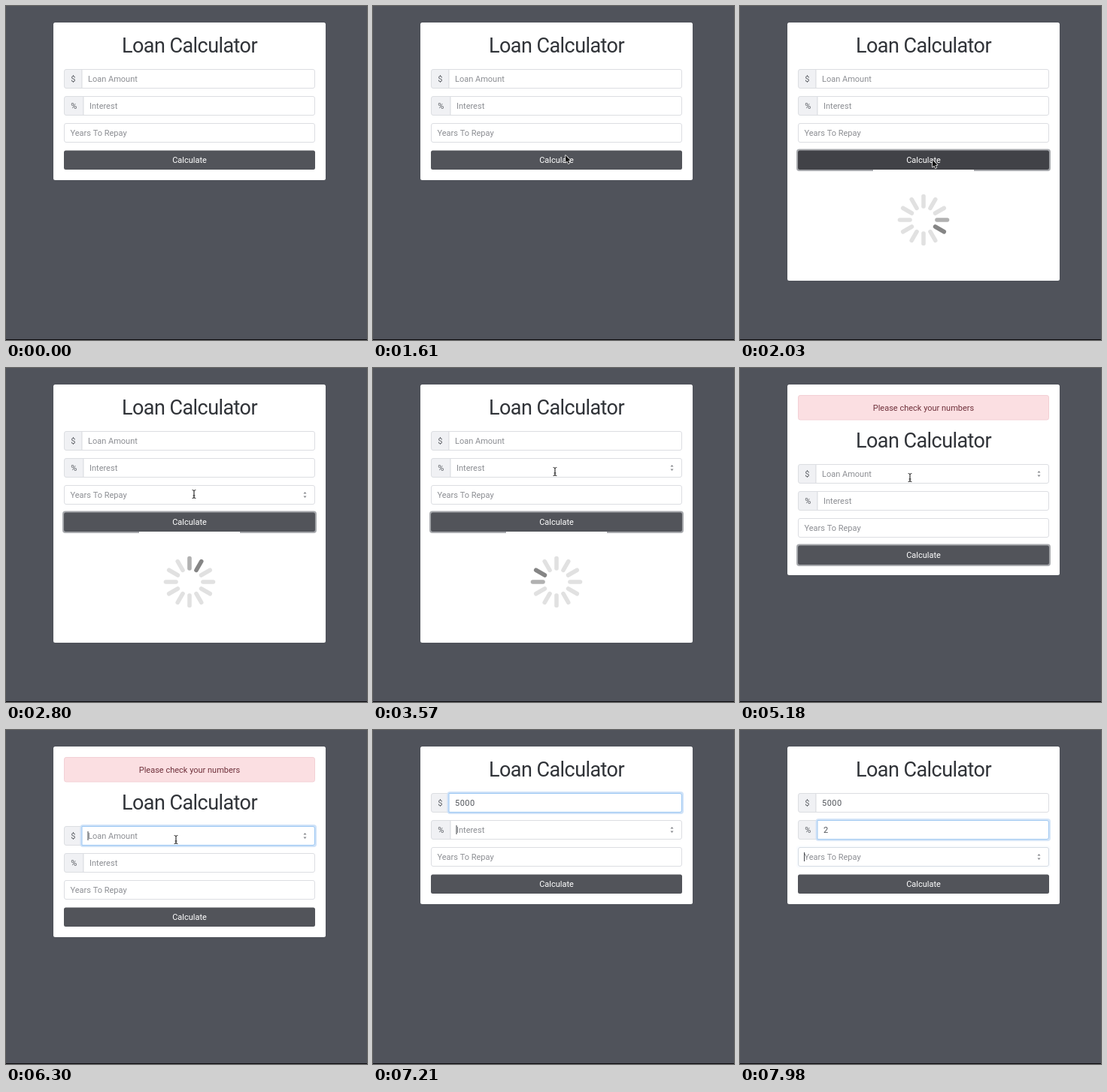
Recreate the animation shown at these times as an HTML page with a canvas. Size 480 by 445 pixels, loop 8000 ms.

```html
<!DOCTYPE html>
<html lang="en">
<head>
<meta charset="utf-8">
<title>Loan Calculator</title>
<style>
html, body { margin: 0; width: 480px; height: 445px; overflow: hidden; background: #50535b; }
canvas { display: block; }
</style>
</head>
<body>
<canvas id="stage" width="480" height="445"></canvas>
<script>
const ctx = document.getElementById('stage').getContext('2d');
const LOOP = 8000;
const FADE = 150;

// Moments of the story, in ms
const LOADING = 2030, ALERT = 4130, LOAN_FOCUS = 5180, TYPING = 6370;
const ALERT_END = 7130, RATE_FOCUS = 7210, YEARS_FOCUS = 7965;

const BUTTON_HOVER = [[560, 880], [1625, 2480]];
const FIELD_HOVER = {
  loan: [[4960, LOAN_FOCUS]],
  rate: [[1090, 1300], [3060, 4330], [4660, 4870]],
  years: [[920, 1070], [1320, 1430], [2620, 3000]]
};

// Pointer path: time, x, y
const PATH = [
  [70, 262, 443], [350, 260, 320], [700, 258, 206], [880, 257, 187],
  [1200, 255, 138], [1470, 256, 189], [1610, 256, 199], [1960, 256, 205],
  [2400, 256, 205], [2800, 250, 168], [3220, 244, 140], [3570, 242, 138],
  [3850, 234, 140], [4060, 226, 150], [4130, 224, 197], [4620, 224, 197],
  [4800, 225, 176], [5040, 226, 146], [6370, 226, 146]
];

const clamp = v => Math.max(0, Math.min(1, v));
const within = (t, spans) => spans.some(([a, b]) => t >= a && t < b);
const fade = (t, on, off) => clamp((t - on) / FADE) - clamp((t - off) / FADE);
const mix = (a, b, k) => `rgb(${a.map((v, i) => Math.round(v + (b[i] - v) * k)).join(',')})`;

function box(x, y, w, h, r, fill, stroke) {
  ctx.beginPath();
  ctx.roundRect(x, y, w, h, r);
  if (fill) { ctx.fillStyle = fill; ctx.fill(); }
  if (stroke) { ctx.strokeStyle = stroke; ctx.lineWidth = 1; ctx.stroke(); }
}

function text(str, x, y, color, { size = 11, align = 'left', track = 0 } = {}) {
  ctx.font = `400 ${size}px Roboto, Inter, sans-serif`;
  ctx.letterSpacing = track + 'px';
  ctx.textAlign = align;
  ctx.textBaseline = 'alphabetic';
  ctx.fillStyle = color;
  ctx.fillText(str, x, y);
}

function ring(x, y, w, h, color, alpha) {
  if (alpha <= 0) return;
  ctx.save();
  ctx.globalAlpha = alpha;
  box(x - 2, y - 2, w + 4, h + 4, 4, color);
  ctx.restore();
}

function spinArrows(x, y) {
  ctx.fillStyle = '#85878b';
  for (const dir of [-1, 1]) {
    ctx.beginPath();
    ctx.moveTo(x - 2, y + dir * 1.5);
    ctx.lineTo(x + 2, y + dir * 1.5);
    ctx.lineTo(x, y + dir * 4);
    ctx.fill();
  }
}

function field({ y, sign, inset = 0, hint, value, focus = 0, spin, caret }) {
  const left = 77 + inset, width = 334 - inset, tx = left + 8.5;
  if (sign) {
    box(77.5, y + 0.5, inset, 25, [2.5, 0, 0, 2.5], '#f0f1f4', '#dcdee2');
    text(sign, 77.5 + inset / 2, y + 17, '#5d6066', { align: 'center' });
  }
  ring(left, y, width, 26, '#cfe2f8', focus);
  const corner = sign ? [0, 2.5, 2.5, 0] : 2.5;
  box(left + 0.5, y + 0.5, width - 1, 25, corner, '#fff', mix([220, 222, 226], [154, 199, 243], focus));
  if (value) text(value, tx, y + 17, '#50545a', { track: 0.45 });
  else text(hint, tx, y + 17, '#8c8e93');
  if (caret) {
    ctx.fillStyle = '#3f4247';
    ctx.fillRect(tx - 0.5, y + 7, 1, 12);
  }
  if (spin) spinArrows(397.5, y + 13);
}

function loader(t) {
  ctx.fillStyle = '#fff';
  ctx.fillRect(177, 218, 134, 134);
  const head = (4 + Math.floor((t - LOADING) / 84 + 0.3)) % 12;
  ctx.lineWidth = 5.6;
  ctx.lineCap = 'round';
  for (let i = 0; i < 12; i++) {
    const a = (i - 3) * Math.PI / 6;
    const age = (head - i + 12) % 12;
    ctx.strokeStyle = ['#858585', '#b1b1b1'][age] || '#e1e1e1';
    ctx.beginPath();
    ctx.moveTo(244 + Math.cos(a) * 18, 285 + Math.sin(a) * 18);
    ctx.lineTo(244 + Math.cos(a) * 31.5, 285 + Math.sin(a) * 31.5);
    ctx.stroke();
  }
  ctx.lineCap = 'butt';
}

function arrow(x, y) {
  ctx.beginPath();
  ctx.moveTo(x, y);
  ctx.lineTo(x, y + 9.5);
  ctx.lineTo(x + 2.2, y + 7.5);
  ctx.lineTo(x + 3.7, y + 11);
  ctx.lineTo(x + 5.2, y + 10.3);
  ctx.lineTo(x + 3.8, y + 7);
  ctx.lineTo(x + 6.6, y + 6.8);
  ctx.closePath();
  ctx.strokeStyle = '#fff';
  ctx.lineWidth = 1.4;
  ctx.lineJoin = 'round';
  ctx.stroke();
  ctx.fillStyle = '#111';
  ctx.fill();
}

function beam(x, y) {
  ctx.strokeStyle = '#222';
  ctx.lineWidth = 1.1;
  ctx.beginPath();
  ctx.moveTo(x, y - 4.5);
  ctx.lineTo(x, y + 4.5);
  for (const s of [-1, 1]) {
    ctx.moveTo(x - 2.4, y + s * 5.5);
    ctx.quadraticCurveTo(x, y + s * 5.3, x, y + s * 4);
    ctx.quadraticCurveTo(x, y + s * 5.3, x + 2.4, y + s * 5.5);
  }
  ctx.moveTo(x - 1.4, y + 2);
  ctx.lineTo(x + 1.4, y + 2);
  ctx.stroke();
}

function pointer(t, shift) {
  if (t < PATH[0][0] || t >= TYPING) return;
  const i = Math.max(1, PATH.findIndex(p => p[0] > t));
  const [t0, x0, y0] = PATH[i - 1], [t1, x1, y1] = PATH[i];
  const k = (t - t0) / (t1 - t0);
  const x = x0 + (x1 - x0) * k, y = y0 + (y1 - y0) * k;
  const overField = [84, 120, 156].some(top => y >= top + shift && y <= top + shift + 26);
  (overField ? beam : arrow)(x, y);
}

function typed(t) {
  const keys = [TYPING, 6510, 6720, 6860];
  return '5000'.slice(0, keys.filter(k => t >= k).length);
}

function draw(t) {
  const alert = t >= ALERT && t < ALERT_END;
  const loading = t >= LOADING && t < ALERT;
  const shift = alert ? 44 : 0;

  ctx.fillStyle = '#50535b';
  ctx.fillRect(0, 0, 480, 445);
  ctx.fillStyle = '#0c0c0e';
  ctx.fillRect(0, 444, 480, 1);
  box(63, 22, 362, loading ? 344 : 210 + shift, 2.5, '#fff');

  if (alert) {
    box(77.5, 36.5, 333, 32.5, 2.5, '#fbdfe2', '#f3d0d5');
    text('Please check your numbers', 244, 57, '#70323c', { align: 'center' });
  }
  text('Loan Calculator', 244, 62.3 + shift, '#303338', { size: 27, align: 'center', track: -0.56 });

  const loanCaret = (t >= LOAN_FOCUS + 70 && t < 5740) || (t >= 6300 && t < TYPING);
  field({
    y: 84 + shift, sign: '$', inset: 23.5, hint: 'Loan Amount', value: typed(t),
    focus: fade(t, LOAN_FOCUS, RATE_FOCUS), caret: loanCaret,
    spin: within(t, FIELD_HOVER.loan) || (t >= LOAN_FOCUS && t < RATE_FOCUS)
  });
  field({
    y: 120 + shift, sign: '%', inset: 25.5, hint: 'Interest', value: t >= 7700 ? '2' : '',
    focus: fade(t, RATE_FOCUS, YEARS_FOCUS), caret: t >= RATE_FOCUS && t < 7700,
    spin: within(t, FIELD_HOVER.rate) || (t >= RATE_FOCUS && t < YEARS_FOCUS)
  });
  field({
    y: 156 + shift, hint: 'Years To Repay',
    focus: fade(t, YEARS_FOCUS, LOOP), caret: t >= YEARS_FOCUS,
    spin: within(t, FIELD_HOVER.years) || t >= YEARS_FOCUS
  });

  const hover = BUTTON_HOVER.reduce((sum, [a, b]) => sum + fade(t, a, b), 0);
  const by = 192.5 + shift;
  ring(77, by, 334, 25.5, '#a7a9ad', fade(t, LOADING - FADE, LOAN_FOCUS));
  box(77, by, 334, 25.5, 2.5, mix([82, 84, 90], [65, 66, 71], hover));
  text('Calculate', 244, 209.2 + shift, '#fff', { align: 'center' });

  if (loading) loader(t);
  pointer(t, shift);
}

const start = performance.now();
function tick() {
  draw((performance.now() - start) % LOOP);
  requestAnimationFrame(tick);
}
draw(0);
requestAnimationFrame(tick);
</script>
</body>
</html>
```
